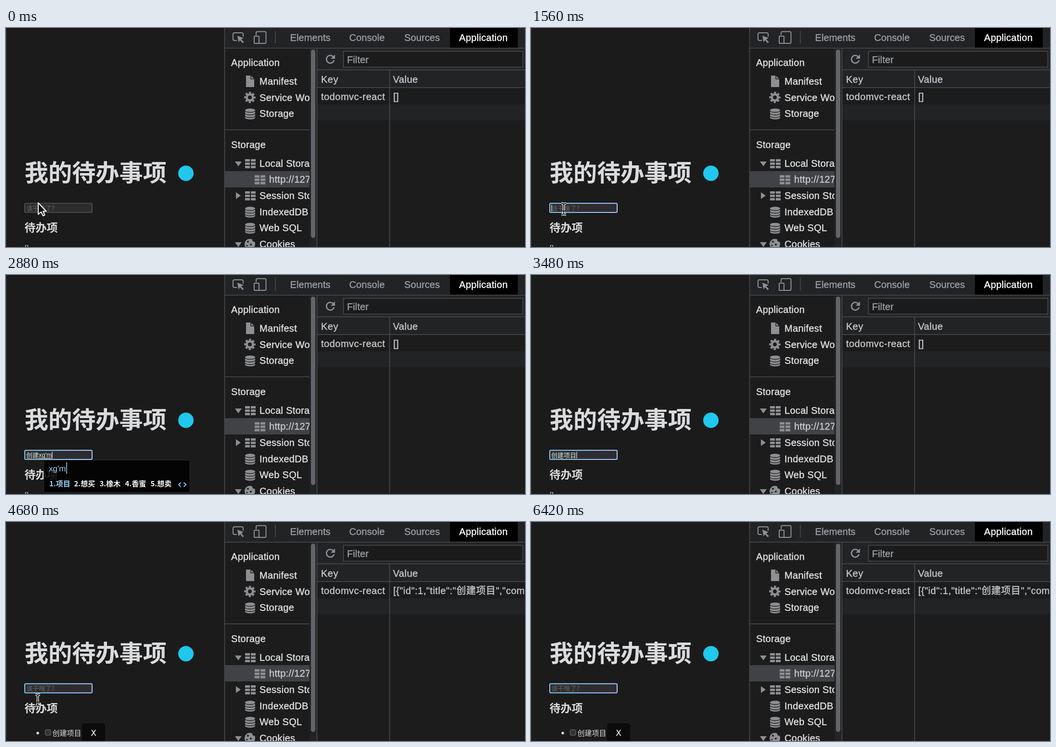
These frames come from a looping animation (1079x456 px, 6480 ms). An HTML page:

```html
<!DOCTYPE html>
<html lang="zh-CN">
<head>
<meta charset="utf-8">
<title>Todo list and local storage</title>
<style>
  html, body { margin: 0; width: 100%; height: 100%; overflow: hidden; background: #1b1b1c; }
  svg { display: block; width: 1079px; height: 456px; }
  text { font-family: "Liberation Sans", "Noto Sans CJK SC", sans-serif; white-space: pre; }
  .cjk, .cjk text { font-family: "Noto Sans CJK SC", "Noto Sans", sans-serif; }
  .tools { font-size: 20px; fill: #e2e3e5; }
  .tools text { stroke: #e2e3e5; stroke-width: .4; }
  .tools .tabs text { stroke: #9b9fa5; }
  .tabs { fill: #9b9fa5; letter-spacing: .1px; }
  .tree { letter-spacing: .3px; }
  .table { letter-spacing: .5px; fill: #c6c8cb; }
  .tools .table text { stroke: #c6c8cb; }
  .icon { fill: #8d8f92; }
  .line { fill: none; stroke: #494b4e; stroke-width: 1.6; }
  .outline { fill: none; stroke: #8d9196; stroke-width: 2; }
  .title { fill: #dadbdd; font-weight: 700; }
  .field { font-size: 13px; fill: #e8e8e8; }
  .cand { font-size: 15px; font-weight: 600; fill: #f4f4f4; }
</style>
</head>
<body>
<svg viewBox="0 0 1079 456">
  <defs>
    <g id="grid"><path d="M0 0h10v5H0zM12 0h10v5H12zM0 7h10v5H0zM12 7h10v5H12zM0 14h10v5H0zM12 14h10v5H12z"/></g>
    <g id="disks">
      <path d="M0 4C0-1 21-1 21 4V19C21 24 0 24 0 19Z"/>
      <path d="M0 5c2 4 19 4 21 0M0 10.500c2 4 19 4 21 0M0 16c2 4 19 4 21 0" fill="none" stroke="#1c1c1d" stroke-width="1.500"/>
    </g>
    <clipPath id="treeClip"><path d="M455 43H631V456H455z"/></clipPath>
    <linearGradient id="ring" x2="1" y2="0"><stop stop-color="#82c8ea"/><stop offset="1" stop-color="#a4c4fa"/></linearGradient>
  </defs>

  <rect width="1079" height="456" fill="#1b1b1c"/>
  <path d="M.5 0V456" stroke="#2e2e30"/>

  <g id="page">
    <text class="title cjk" x="38.800" y="319" font-size="49.200">我的待办事项</text>
    <circle cx="374" cy="302.500" r="16" fill="#1fc8ec"/>
    <rect x="38.500" y="364.500" width="141" height="20" rx="2" fill="#2d2d2f"/>
    <rect id="border" x="39" y="365" width="140" height="19" rx="2" fill="none"/>
    <text id="hint" class="field cjk" x="42.500" y="379.500" style="fill:#6a6a6c">该干啥了?</text>
    <text id="typed" class="field cjk" x="42" y="379.500"></text>
    <text id="code" class="field" y="379"></text>
    <path id="under" stroke="#e0e0e0" stroke-width="1.200"/>
    <rect id="caret" y="368" width="1.300" height="14" fill="#e8e8e8"/>
    <text class="title cjk" x="38.500" y="424" font-size="23">待办项</text>
    <text x="39" y="463" font-size="14" fill="#d0d0d0">[]</text>
  </g>

  <g id="item">
    <rect x="30" y="420" width="200" height="36" fill="#1b1b1c"/>
    <circle cx="66" cy="439.500" r="2.700" fill="#dedede"/>
    <rect x="81.500" y="432.500" width="11.500" height="11.500" rx="2" fill="#333335" stroke="#747476"/>
    <text class="cjk" x="96.500" y="444.500" font-size="15" fill="#dedede">创建项目</text>
    <rect x="158" y="419" width="48" height="45" rx="6" fill="#0b0b0b"/>
    <text x="182" y="445" font-size="16" text-anchor="middle" fill="#f2f2f2" stroke="#f2f2f2" stroke-width=".4">X</text>
  </g>

  <g class="tools">
    <path d="M454 0H1079V456H454z" fill="#1c1c1d"/>
    <path d="M454 0H1079V42H454zM647 43H1079V124H647zM647 159H1079V192H647zM631 43H646V456H631z" fill="#222325"/>
    <path d="M923 0H1064V41H923z" fill="#000"/>
    <path d="M701 48H1075V82H701z" fill="#1b1b1c"/>
    <path class="line" d="M454.500 0V456M454 42H1079M560 6V32M646.500 43V456M454 212H631M647 87H1079M647 124H1079M797.500 88V456M701.500 48.500H1074.500V81.500H701.500Z"/>
    <rect x="634" y="45" width="9" height="392" rx="4.500" fill="#626467"/>

    <path class="outline" d="M480 26h-5q-3 0-3-3V13q0-3 3-3h15q3 0 3 3v5"/>
    <path class="icon" d="M481 16l13 5-5 2.500 5.500 6-2.500 2-5.500-6-3 4.500z"/>
    <path class="outline" d="M520 15V10q0-2.500 2.500-2.500H538q2.500 0 2.500 2.500V29.500q0 2.500-2.500 2.500H526"/>
    <rect class="outline" x="516" y="17" width="10" height="15" rx="1"/>
    <path class="outline" d="M680 59.500a8 8 0 1 0 2 7.500" style="stroke-width:2.600"/>
    <path class="icon" d="M684 55v9h-9z"/>

    <g class="tabs">
      <text x="590.500" y="26.500">Elements</text>
      <text x="713.500" y="26.500">Console</text>
      <text x="828" y="26.500">Sources</text>
      <text x="942" y="26.500" letter-spacing=".3" style="fill:#fff;stroke:#fff">Application</text>
      <text x="709" y="72.500">Filter</text>
    </g>

    <g clip-path="url(#treeClip)">
      <path d="M455 298H631V332H455z" fill="#414245"/>
      <g class="icon">
        <path d="M499 99h10l7 7v17H499z"/>
        <path d="M509 99v7h7" fill="none" stroke="#1c1c1d" stroke-width="1.500"/>
        <g fill="none" stroke="#8d8f92">
          <circle cx="507" cy="144.500" r="6.400" stroke-width="4.800"/>
          <circle cx="507" cy="144.500" r="9.800" stroke-width="4" stroke-dasharray="4.300 3.397" stroke-dashoffset="2.150"/>
        </g>
        <use href="#disks" x="497" y="167.500"/>
        <use href="#disks" x="497" y="372"/>
        <use href="#disks" x="497" y="405.500"/>
        <use href="#grid" x="497" y="273"/>
        <use href="#grid" x="517" y="306.500"/>
        <use href="#grid" x="497" y="340"/>
        <path d="M476 278h14l-7 10zM478 342v14l10-7zM476 446h14l-7 10z"/>
        <circle cx="507" cy="450" r="11"/>
        <g fill="#1c1c1d">
          <circle cx="516" cy="441" r="4"/><circle cx="503" cy="445" r="2"/>
          <circle cx="509" cy="451" r="2"/><circle cx="501" cy="453" r="1.600"/>
        </g>
      </g>
      <g id="tree" class="tree"></g>
    </g>

    <g class="table">
      <text x="655" y="114">Key</text>
      <text x="804.500" y="114">Value</text>
      <text x="655" y="150">todomvc-react</text>
      <text id="value" x="805" y="150"></text>
    </g>
  </g>

  <g id="popup">
    <rect id="panel" x=".5" y="385.500" height="67" rx="3" fill="#000" fill-opacity=".86" stroke="#2b2b2b"/>
    <text id="preedit" x="11" y="409" font-size="17" fill="#9ccdf0"></text>
    <rect id="bar" y="390" width="1.500" height="24" fill="#9ccdf0"/>
    <g id="cands" class="cjk"></g>
    <path id="arrows" d="M6 432l-4.500 4.500 4.500 4.500M12 432l4.500 4.500-4.500 4.500" fill="none" stroke="#69b4ea" stroke-width="2.400"/>
  </g>

  <path id="arrow" d="M0 0V24L6 19L10 27L13.500 25.500L10 17.500H16.500Z" fill="#0c0c0c" stroke="#fff" stroke-width="2" stroke-linejoin="round"/>
  <g id="beam" fill="none">
    <path id="stem" d="M-5-12Q0-12 0-8Q0-12 5-12M0-9V9M-5 12Q0 12 0 8Q0 12 5 12M-3 4H3" stroke="#fff" stroke-width="4.400"/>
    <path d="M-5-12Q0-12 0-8Q0-12 5-12M0-9V9M-5 12Q0 12 0 8Q0 12 5 12M-3 4H3" stroke="#111" stroke-width="1.800"/>
  </g>
</svg>

<script>
const LOOP = 6480, FOCUS = 540, SUBMIT = 3840, BLINK = 500;
const $ = id => document.getElementById(id);
const show = (id, on) => $(id).setAttribute('visibility', on ? 'visible' : 'hidden');
const set = (id, attrs) => { for (const k in attrs) $(id).setAttribute(k, attrs[k]); };
const shift = (id, x, y) => set(id, { transform: `translate(${x} ${y})` });

function addText(parent, string, x, y, attrs = {}) {
  const el = document.createElementNS('http://www.w3.org/2000/svg', 'text');
  el.textContent = string;
  for (const [k, v] of Object.entries({ x, y, ...attrs })) el.setAttribute(k, v);
  parent.append(el);
}

const tree = [
  ['Application', 468, 79], ['Manifest', 527, 118], ['Service Workers', 527, 151.5],
  ['Storage', 527, 185], ['Storage', 468, 249.5], ['Local Storage', 527, 289],
  ['http://127.0.0.1', 547, 322], ['Session Storage', 527, 356],
  ['IndexedDB', 527, 389.5], ['Web SQL', 527, 423], ['Cookies', 527, 457]
];
tree.forEach(([s, x, y]) => addText($('tree'), s, x, y, s.startsWith('http') ? { style: 'fill:#c9cbce;stroke:#c9cbce' } : {}));

// time, committed text, pending keys, candidates
const keys = [
  [0, '', ''],
  [1680, '', 'a', '出 成 车 长 吃'],
  [1800, '', 'ag', '创 窗 床 闯 双'],
  [1920, '', "ag'j", '创建 创见 窗间 创 窗'],
  [2040, '', "ag'jf", '创建 创见 窗间 创 窗'],
  [2400, '创建', ''],
  [2700, '创建', 'x', '下 小 想 新 向'],
  [2760, '创建', 'xg', '想 向 像 项 香'],
  [2880, '创建', "xg'm", '项目 想买 橡木 香蜜 想卖'],
  [3000, '创建', "xg'mu", '项目 橡木 想 向 像'],
  [3240, '创建项目', ''],
  [SUBMIT, '', '']
];

// time, x, y of the pointer's hot spot
const moves = [
  [0, 67, 364], [120, 67, 364], [360, 68, 377], [4560, 68, 377],
  [4680, 66, 371], [4900, 66, 379], [6040, 66, 379], [6360, 36, 475]
];

function pointerAt(t) {
  const i = moves.findLastIndex(m => m[0] <= t);
  const [t0, x0, y0] = moves[i];
  const [t1, x1, y1] = moves[i + 1] || [LOOP, x0, y0];
  const p = (t - t0) / (t1 - t0), e = p * p * (3 - 2 * p);
  return [x0 + (x1 - x0) * e, y0 + (y1 - y0) * e];
}

let current = -1;

function applyKey(i) {
  if (i === current) return;
  current = i;
  const [, text, code, list] = keys[i];
  const left = 42 + text.length * 13;
  $('typed').textContent = text;
  $('code').textContent = $('preedit').textContent = code;
  set('code', { x: left });
  const end = left + $('code').getComputedTextLength();
  set('under', { d: code ? `M${left} 381.5H${end}` : '' });
  set('caret', { x: end + .3 });
  show('popup', !!code);
  if (!code) return;

  shift('popup', left + 10, 0);
  set('bar', { x: 12 + $('preedit').getComputedTextLength() });
  $('cands').replaceChildren();
  let x = 12, edge = x;
  list.split(' ').forEach((word, n) => {
    addText($('cands'), `${n + 1}.${word}`, x, 440, { class: 'cand', style: n ? '' : 'fill:#9ccdf0' });
    edge = x + 14 + 15 * word.length;
    x += (n ? 23 : 21.5) + 15 * word.length;
  });
  shift('arrows', edge + 13, 0);
  set('panel', { width: edge + 37 });
}

function render(t) {
  const done = t >= SUBMIT, focused = t >= FOCUS;
  const i = keys.findLastIndex(k => k[0] <= t);
  const [since, text, code] = keys[i];
  applyKey(i);

  shift('page', 0, done ? -28.3 : 0);
  show('item', done);
  show('hint', !text && !code);
  set('border', focused ? { stroke: 'url(#ring)', 'stroke-width': 2 } : { stroke: '#68686b', 'stroke-width': 1.2 });
  show('caret', focused && Math.floor((t - (since || FOCUS)) / BLINK) % 2 === 0);
  $('value').textContent = done ? '[{"id":1,"title":"创建项目","completed":false}]' : '[]';

  const [x, y] = pointerAt(t);
  const hidden = t >= keys[1][0] && t < 4560;
  const isArrow = y < 366 && t < FOCUS;
  shift('arrow', x, y);
  shift('beam', x, y);
  show('arrow', isArrow && !hidden);
  show('beam', !isArrow && !hidden);
}

const start = performance.now();
function tick() {
  render((performance.now() - start) % LOOP);
  requestAnimationFrame(tick);
}
tick();
</script>
</body>
</html>
```
